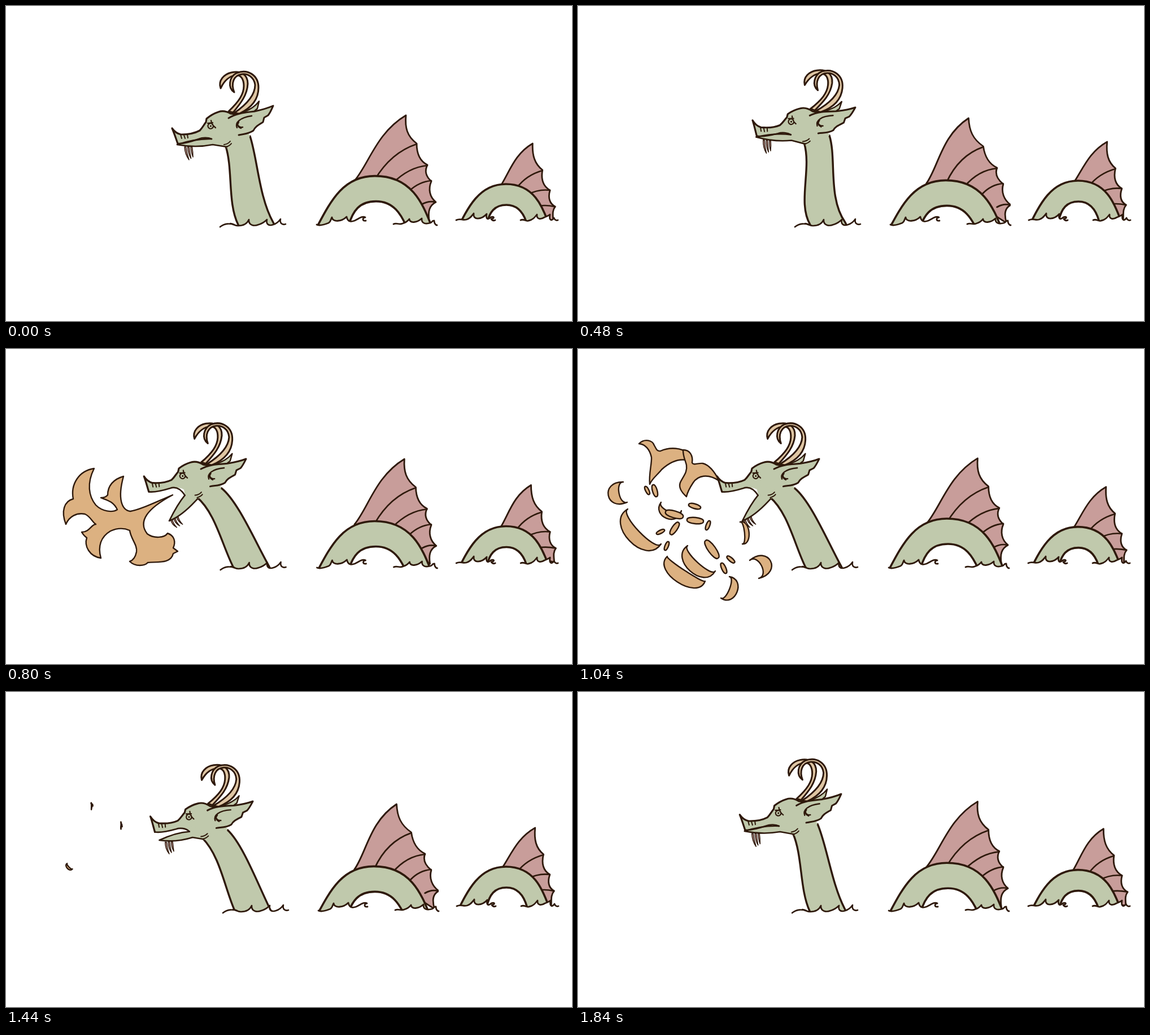
These frames come from a looping animation (1002 px wide and 559 px high, 1920 ms). An HTML page with a canvas:

```html
<!DOCTYPE html>
<html lang="en">
<head>
<meta charset="utf-8">
<title>Sea serpent</title>
<style>
html, body { margin: 0; width: 100%; height: 100%; overflow: hidden; background: #fff; }
canvas { display: block; width: 100vw; height: 100vh; }
</style>
</head>
<body>
<canvas id="stage" width="1002" height="559"></canvas>
<script>
const ctx = document.getElementById('stage').getContext('2d');
const LOOP = 1920, SWAY = 960, STEP = 40;
const INK = '#2e190b', GREEN = '#c0c9ac', PINK = '#c89d9a', FIRE = '#dcb181', HORN = '#dfc6a4';

const lerp = (a, b, k) => a + (b - a) * k;
const clamp = k => Math.max(0, Math.min(1, k));
const wave = (t, lag = 0) => 2 * Math.PI * (t - lag) / SWAY;

// time, ear x, ear y, head tilt in degrees, mouth opening
const POSES = [
  [0, 473, 177, 0, 0], [160, 485, 179, 3.55, 0], [480, 491, 180, 5.45, 0],
  [560, 489, 180.5, 5.2, 0], [720, 440, 191, 3.5, .7], [800, 425, 195, 2.9, 1],
  [1040, 427, 195, 2.9, 1], [1200, 430, 195, 3.3, .8], [1440, 437, 194, 4.2, .25],
  [1640, 451, 188, 2.8, 0], [1840, 466, 181, 1.05, 0], [1920, 473, 177, 0, 0]
];

function poseAt(t) {
  const i = POSES.findIndex(p => p[0] > t);
  const a = POSES[i - 1], b = POSES[i], k = (t - a[0]) / (b[0] - a[0]);
  const [, x, y, deg, open] = a.map((v, n) => lerp(v, b[n], k));
  return { x, y, tilt: deg * Math.PI / 180, open };
}

function draw(path, fill, width) {
  const p = typeof path === 'string' ? new Path2D(path) : path;
  if (fill) { ctx.fillStyle = fill; ctx.fill(p); }
  if (width) { ctx.strokeStyle = INK; ctx.lineWidth = width; ctx.stroke(p); }
}

function group(fn) { ctx.save(); fn(); ctx.restore(); }

// ---- humps and fins ----
const HUMPS = [
  {
    body: 'M540 412C570 358 590 302 653 302C725 302 741 362 757 400L712 400C700 368 685 347 655 347C627 347 613 362 605 396L600 412Z',
    fin: 'M617 310C643 279 656 225 708 194C706 216 710 231 727 244C727 262 732 275 746 282C740 294 745 304 753 311C747 325 750 339 761 348C749 354 747 365 749 380L700 345Z',
    ribs: 'M727 245C697 255 672 276 653 308M746 283C724 285 703 296 684 315M753 310C740 311 726 317 714 328M760 348C752 346 745 347 736 352',
    left: 'M550 388C556 391 566 387 571 385C575 383 575 378 577 375C578 384 594 383 603 374C605 384 611 383 617 381C624 378 630 372 636 375C630 376 631 382 637 381',
    right: 'M686 387C692 384 696 389 702 386C708 384 712 381 714 378C715 386 727 385 736 377C735 387 744 387 751 385C756 383 753 381 758 381C758 386 761 389 763 389',
    x: [550, 686], mid: 'M630 383H695V0H630Z', root: 312
  },
  {
    body: 'M796 402C818 356 838 316 885 316C934 316 950 355 962 390L924 394C918 366 905 353 886 353C866 353 855 364 850 392L846 402Z',
    fin: 'M877 316C893 290 902 261 933 243C932 264 936 279 950 290C947 306 951 319 963 326C959 339 962 350 972 355C966 362 968 371 968 380L935 370L900 335Z',
    ribs: 'M950 291C932 296 916 306 904 322M963 326C949 324 936 327 922 334M971 355C962 353 954 352 942 354',
    left: 'M797 380C804 376 808 381 815 379C822 377 824 373 828 368C826 381 842 379 851 369C849 378 853 380 858 375C864 372 866 377 859 378C861 381 864 381 866 380',
    right: 'M911 380C917 377 920 383 925 381C932 380 936 375 940 370C939 379 947 379 953 375C958 373 961 372 963 370C961 381 966 382 970 376C971 379 974 381 977 380',
    x: [797, 911], mid: 'M858 381H918V0H858Z', root: 322
  }
];

function hump(h, m) {
  group(() => {
    ctx.translate(m.water, 0);
    ctx.clip(new Path2D(`${h.left}V0H${h.x[0]}Z${h.right}V0H${h.x[1]}Z${h.mid}`));
    ctx.translate(-m.water, 0);
    group(() => {
      // lean the fin sideways in proportion to the height above its root
      ctx.transform(1, 0, -m.lean, 1, m.lean * h.root, m.finY);
      draw(h.fin, PINK, 2.8);
      draw(h.ribs, null, 2.6);
    });
    ctx.translate(m.x, m.y);
    draw(h.body, GREEN, 3.6);
  });
  group(() => {
    ctx.translate(m.water, 0);
    draw(h.left + h.right, null, 2.8);
  });
}

function humps(t) {
  const dip = Math.pow((1 - Math.cos(wave(t))) / 2, 1.3);
  hump(HUMPS[0], {
    x: -2 * dip, y: 3.5 - 4.5 * Math.cos(wave(t, 80)),
    lean: -.14 * dip, finY: 5 * dip - .5 * Math.sin(wave(t)), water: 3 * dip
  });
  hump(HUMPS[1], {
    x: 0, y: -3 + 3 * Math.cos(wave(t)),
    lean: (1.5 + 5 * Math.sin(wave(t, 70))) / 79,
    finY: 2.5 * Math.cos(wave(t, 140)) - .5, water: dip
  });
}

// ---- neck and head ----
const SURF = 'M379 392C388 385 396 386 404 388C400 386 398 386 397 386C404 388 407 390 411 390C420 390 427 386 430 379C429 390 440 391 447 388C454 386 458 383 462 379C460 387 465 391 473 388C480 386 484 381 486 378C484 386 490 389 495 387';

function neck(pose, t) {
  const cos = Math.cos(pose.tilt), sin = Math.sin(pose.tilt);
  const at = (x, y) => [
    pose.x + (x - 473) * cos - (y - 177) * sin,
    pose.y + (x - 473) * sin + (y - 177) * cos
  ];
  const d = pose.x - 473, drag = Math.min(0, d) * .17;
  const l = at(389, 249), r = at(432, 231), top = at(400, 225);
  const l1 = [402 + .65 * d, 290], l2 = [392 - .1 * d - .006 * d * d, 350], l3 = [411 + drag, 388];
  const r1 = [445 + .72 * d, 270], r2 = [448 - .2 * d - .0075 * d * d, 340], r3 = [473 + drag, 384];
  const water = 5 * Math.pow((1 - Math.cos(wave(t))) / 2, 1.5);
  group(() => {
    ctx.translate(water, 0);
    ctx.clip(new Path2D(SURF + 'V0H200V392Z'));
    ctx.translate(-water, 0);
    draw(`M${l}C${l1} ${l2} ${l3}l5 10H${480 + drag}L${r3}C${r2} ${r1} ${r}L${top}Z`, GREEN);
    draw(`M${l}C${l1} ${l2} ${l3}l5 10M${r}C${r1} ${r2} ${r3}l7 14`, null, 3.4);
  });
  group(() => {
    ctx.translate(water, 0);
    draw(SURF, null, 2.6);
  });
}

function jaw(open) {
  const p = (x0, y0, x1, y1) => `${lerp(x0, x1, open)} ${lerp(y0, y1, open)} `;
  const corner = p(364, 236, 368, 247);
  const tipX = lerp(303, 342.7, open), tipY = lerp(246, 293.7, open);
  const edge = `M${corner}Q${p(336, 235, 356, 263)}${tipX} ${tipY}Q${p(336, 252, 364, 284)}${p(366, 246, 387, 256.5)}L${p(391, 250, 391, 252)}`;
  for (let i = 0; i < 3; i++) {
    const x = tipX + lerp(14 + 5.5 * i, 4 + 5 * i, open);
    const y = tipY + lerp(4, -2 - 3 * i, open);
    const dx = lerp(7 - 2 * i, 10, open), dy = lerp(23 - 2.5 * i, 13, open);
    const strand = `M${x - 1} ${y}Q${x} ${y + dy * .6} ${x + dx} ${y + dy}Q${x + 3} ${y + dy * .5} ${x + 1.5} ${y}Z`;
    draw(strand, PINK, 1.5);
  }
  draw(edge + 'L402 236L364 228Z', GREEN);
  draw(edge, null, 2.6);
  draw(`M304 244C316 245 330 240 341 236C348 233 358 233 ${corner}`, null, 2.6);
}

function horns() {
  draw('M394 187C413 169 421 156 421 142C421 130 416 123 409 123C396 123 386 133 380 146C375 132 386 121 399 118C416 114 428 122 428 138C427 158 416 172 402 189Z', HORN, 3);
  draw('M404 190C427 174 441 157 441 140C439 125 427 120 418 121C402 123 398 138 404 153C392 145 395 126 408 119C427 111 447 122 447 145C447 166 434 181 413 191Z', HORN, 3);
}

function head(pose) {
  const crown = 'M304 244C301 236 298 226 294 217C299 224 304 227 310 228C322 228 334 226 343 221C348 216 350 211 354 206L355 200C362 194 370 190 376 188C384 185 391 187 398 191L412 193';
  const ear = 'M394 199C408 190 424 189 440 187C454 184 464 181 473 177C470 184 468 189 464 194L457 198L455 206C447 211 441 214 438 221C430 227 420 227 412 229';
  group(() => {
    ctx.translate(pose.x, pose.y);
    ctx.rotate(pose.tilt);
    ctx.translate(-473, -177);
    draw('M418 190C430 184 440 180 448 169L445 182L436 190Z', GREEN, 2.4);
    horns();
    draw(crown + 'L432 231C420 240 400 246 391 252C385 246 372 240 364 236C352 231 338 237 330 240C320 243 312 245 304 244Z', GREEN);
    jaw(pose.open);
    draw(crown, null, 3.2);
    draw(ear + 'L402 212Z', GREEN);
    draw(ear, null, 3);
    draw('M409 216C405 207 414 198 435 195M409 208C410 213 414 216 419 215M412 206Q407 213 416 217', null, 2.4);
    draw('M309 228L311 235M315 229L317 235M321 228L322 234M386 246Q393 245 397 240M390 250Q396 248 399 244', null, 2);
    draw('M367 213A4.8 4.8 0 1 1 366 210M357 208L366 207M363 203Q364 211 371 216', null, 2.2);
    draw('M364 213A1.6 1.6 0 1 1 360.8 213A1.6 1.6 0 1 1 364 213Z', INK);
  });
}

// ---- fire ----
const FLAME = 'M295 259C262 273 238 285 220 288C205 286 197 266 208 226C190 231 180 243 180 259C177 263 173 264 168 264C178 268 190 270 197 285C188 291 170 288 159 277C146 261 143 238 156 212C129 216 114 240 119 266C103 270 97 288 106 311C112 297 125 290 140 293C149 297 153 307 159 311C151 311 148 325 134 325C137 330 140 333 143 335C138 350 148 368 168 371C162 350 168 333 185 323C196 318 208 317 219 322C221 337 233 348 231 360C229 370 225 375 219 377C229 387 246 385 251 379C266 377 292 382 296 363L304 359L296 353C301 342 298 331 286 327C281 335 262 337 250 328C233 306 250 283 295 259Z';

// flame tongues that linger as slivers: path and the point they shrink to
const TONGUES = [
  ['M108 168C118 158 132 162 135 171C139 178 140 182 146 181C164 173 184 176 192 184L200 199C180 192 162 201 148 214C140 224 131 230 127 240C125 222 131 203 130 192C127 178 119 169 108 168Z', 152, 203],
  ['M186 179C198 179 204 189 202 202C205 207 212 202 221 203C233 206 243 220 250 234C229 220 212 225 204 237C198 246 194 253 192 262C183 254 178 245 181 237C186 226 194 219 192 206C190 197 186 192 186 179Z', 204, 240]
];

// crescents: two tips, outer bulge, inner bulge
const CRESCENTS = [
  [88, 284, 147, 346, .85, .3], [80, 236, 87, 272, 1.65, .6], [147, 272, 183, 287, 1.15, .5],
  [158, 368, 225, 412, .7, .1], [194, 349, 243, 394, .9, .3], [287, 307, 291, 346, -.7, -.3],
  [304, 375, 320, 407, -1.8, -.8], [268, 404, 253, 442, -1.1, -.4], [226, 340, 248, 371, .35, -.35]
];

const SPARKS = [
  [119, 244, 126, 258], [133, 241, 139, 262], [196, 276, 217, 282], [193, 303, 222, 306],
  [178, 308, 164, 329], [153, 321, 139, 328], [160, 342, 154, 357], [233, 305, 227, 321],
  [254, 380, 262, 398], [264, 368, 277, 379], [155, 289, 186, 298]
];

function shrunk(path, x, y, ky, kx = ky) {
  if (ky < .08) return;
  const p = new Path2D();
  p.addPath(new Path2D(path), new DOMMatrix([kx, 0, 0, ky, x * (1 - kx), y * (1 - ky)]));
  draw(p, FIRE, 2.4);
}

function crescent([x0, y0, x1, y1, outer = .38, inner = -.38], k, cx, cy) {
  const dx = x1 - x0, dy = y1 - y0;
  // control point beside a tip, pushed past the end for round bulges
  const ctrl = (x, y, b, end) => {
    const past = end * Math.abs(b) * .15;
    return `${x - dy * b * .67 + dx * past} ${y + dx * b * .67 + dy * past} `;
  };
  const path = `M${x0} ${y0}C${ctrl(x0, y0, outer, -1)}${ctrl(x1, y1, outer, 1)}${x1} ${y1}` +
    `C${ctrl(x1, y1, inner, 1)}${ctrl(x0, y0, inner, -1)}${x0} ${y0}Z`;
  const b = (outer + inner) / 4;
  shrunk(path, cx ?? (x0 + x1) / 2 - dy * b, cy ?? (y0 + y1) / 2 + dx * b, k);
}

function fire(t) {
  if (t < 700 || t > 1500) return;
  if (t < 920) {
    const k = t < 800 ? lerp(.35, 1, (t - 720) / 80) : 1 + (t - 800) / 1000;
    shrunk(FLAME, 295, 259, k);
    return;
  }
  const slow = clamp(1 - (t - 1120) / 380), fast = clamp(1 - (t - 1120) / 280);
  group(() => {
    const spread = lerp(.85, 1, clamp((t - 920) / 120));
    ctx.translate(295 * (1 - spread), 259 * (1 - spread));
    ctx.scale(spread, spread);
    TONGUES.forEach(([path, x, y]) => shrunk(path, x, y, slow, slow ** 1.8));
    CRESCENTS.forEach((c, i) => i ? crescent(c, fast) : crescent(c, slow, 112, 308));
    SPARKS.forEach(s => crescent(s, fast));
  });
}

const start = performance.now();

function frame() {
  const t = Math.floor((performance.now() - start) % LOOP / STEP) * STEP;
  const pose = poseAt(t);
  ctx.fillStyle = '#fff';
  ctx.fillRect(0, 0, 1002, 559);
  humps(t);
  fire(t);
  neck(pose, t);
  head(pose);
  requestAnimationFrame(frame);
}

ctx.lineJoin = ctx.lineCap = 'round';
frame();
</script>
</body>
</html>
```
